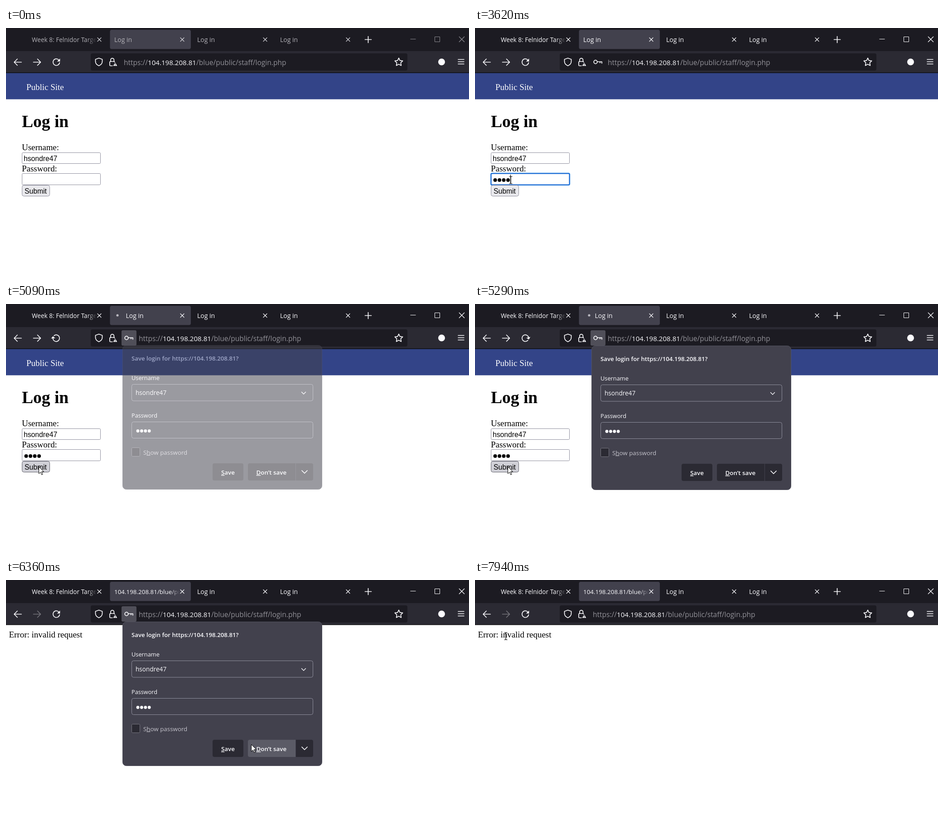
An HTML page that plays this animation: 1022 px wide and 548 px high, repeating every 8 s.

```html
<!DOCTYPE html>
<html lang="en">
<head>
<meta charset="utf-8">
<title>Login form</title>
<style>
html, body { margin: 0; width: 100%; height: 100%; overflow: hidden; background: #fff; }
svg { display: block; width: 1022px; height: 548px; }
text { white-space: pre; }
.ui { font-family: "Open Sans", "Noto Sans", sans-serif; font-size: 14px; fill: #fbfbfe; }
.serif { font-family: "Liberation Serif", "Times New Roman", serif; font-size: 18.95px; fill: #000; }
.form { font-family: "Liberation Sans", Arial, sans-serif; font-size: 15.7px; fill: #000; }
.line { fill: none; stroke: #fbfbfe; stroke-width: 1.7; stroke-linecap: round; stroke-linejoin: round; }
.thin { stroke-width: 1.2; }
.box { fill: #fff; stroke: #8f8f9d; }
.field { fill: #42414d; stroke: #8f8f9d; }
.bold { font-weight: 600; }
.key { text-decoration: underline; }
</style>
</head>
<body>
<svg viewBox="0 0 1022 548">
  <defs>
    <linearGradient id="fadeDark"><stop offset="0" stop-color="#1c1b22" stop-opacity="0"/><stop offset=".45" stop-color="#1c1b22"/></linearGradient>
    <linearGradient id="fadeTab"><stop offset="0" stop-color="#42414d" stop-opacity="0"/><stop offset=".5" stop-color="#42414d"/></linearGradient>
  </defs>
  <rect width="1022" height="548" fill="#fff"/>

  <g id="login">
    <rect y="99" width="1022" height="58.5" fill="#334488"/>
    <text class="serif" x="45" y="137" style="fill:#fff">Public Site</text>
    <text class="serif" x="35" y="218.5" style="font-size:37.5px;font-weight:bold">Log in</text>
    <text class="serif" x="35" y="270">Username:</text>
    <rect class="box" x="35.5" y="275.5" width="173" height="24" rx="2"/>
    <text class="form" x="39" y="294">hsondre47</text>
    <text class="serif" x="35" y="317">Password:</text>
    <rect id="glow" x="33.5" y="319.5" width="177" height="29" rx="4" fill="#a6d3f7"/>
    <rect id="pass" class="box" x="35.5" y="321.5" width="173" height="25" rx="2"/>
    <g id="dots"></g>
    <rect id="caret" y="324" width="1" height="19"/>
    <rect id="submit" x="35.5" y="347.5" width="61" height="24" rx="4"/>
    <text class="form" x="41" y="365.5">Submit</text>
  </g>
  <text id="error" class="serif" x="6.5" y="127">Error: invalid request</text>

  <rect width="1022" height="51" fill="#1c1b22"/>
  <rect y="51" width="1022" height="47" fill="#2b2a33"/>
  <rect y="98" width="1022" height="1.5" fill="#0c0c0d"/>
  <rect x="229.5" y="4" width="178.5" height="42.5" rx="4" fill="#42414d"/>
  <g id="titles" class="ui">
    <text x="57" y="31" style="font-size:13.6px">Week 8: Felnidor Targets</text>
    <rect x="178" y="8" width="50" height="36" fill="url(#fadeDark)"/>
    <text id="tab" y="31"></text>
    <rect x="363" y="8" width="41" height="36" fill="url(#fadeTab)"/>
    <text x="422" y="31">Log in</text>
    <text x="605" y="31">Log in</text>
  </g>
  <circle id="throb" cy="25" r="2.6" fill="#b9b8c0"/>
  <g id="closers" class="line thin"></g>
  <path class="line" d="M792.5 25.5h14M799.5 18.5v14"/>
  <g id="controls" class="line" style="stroke-linecap:butt">
    <path stroke-width="1" style="stroke-width:1" d="M892.5 24.5h12M946.5 19.5h11v11h-11z"/>
    <path style="stroke-width:1.4" d="M1000 19l12 12m0-12l-12 12"/>
  </g>

  <path class="line" d="M34 75.5H18.5M25 68.5l-7 7 7 7"/>
  <path id="forward" class="line" d="M60.5 75.5H76M69.5 68.5l7 7-7 7"/>
  <g id="reload">
    <path class="line" d="M116.5 70.5A7.3 7.3 0 1 0 118.3 76.5"/>
    <path d="M119.3 67.5v6.5h-6.5z" fill="#fbfbfe"/>
  </g>
  <rect x="187" y="56" width="699" height="38" rx="4" fill="#1c1b22"/>
  <path class="line" d="M205 66.5l7.5 2.8v4.7c0 5-3.5 7.7-7.5 9.5-4-1.8-7.5-4.5-7.5-9.5v-4.7z"/>
  <rect class="line" x="229" y="74" width="11" height="9.5" rx="1.5"/>
  <path class="line" d="M231 74v-3.5a3.7 3.7 0 0 1 7.4 0V74"/>
  <path d="M241 75l5.3 9.3h-10.6z" fill="#fbfbfe" stroke="#1c1b22" stroke-width="1.2"/>
  <path d="M241 78v3m0 1v1.2" stroke="#1c1b22" stroke-width="1.2"/>
  <g id="keyIcon">
    <rect id="keyBack" x="255" y="58" width="33" height="34" rx="3" fill="#504f59"/>
    <circle class="line" cx="266" cy="75" r="3.8"/>
    <path class="line" d="M270 74.5h10v3.5M276 74.5v2.5"/>
  </g>
  <g id="url" class="ui" style="font-size:15.55px">
    <text x="260" y="82" fill="#929198">https://</text>
    <text x="313" y="82" style="font-size:15.1px">104.198.208.81</text>
    <text x="420" y="82" fill="#929198">/blue/public/staff/login.php</text>
  </g>
  <path id="star" class="line"/>
  <circle cx="961.5" cy="75" r="7.5" fill="#fbfbfe"/>
  <path class="line" style="stroke-width:1.5" d="M998 69.5h13m-13 5h13m-13 5h13"/>

  <g id="panel" class="ui" style="font-size:13.35px">
    <rect x="257.5" y="92.5" width="440" height="318" rx="8" fill="#42414d" stroke="#52525e"/>
    <text class="bold" x="277" y="126" style="font-size:13.2px">Save login for https://104.198.208.81?</text>
    <text x="277" y="169" style="font-size:12.8px">Username</text>
    <rect class="field" x="277.5" y="178.5" width="400" height="36.5" rx="4"/>
    <text x="286" y="202" style="font-size:13.6px">hsondre47</text>
    <path class="line" style="stroke-width:1.4" d="M652.5 195.5l4.5 4.5 4.5-4.5"/>
    <text x="277" y="252" style="font-size:12.7px">Password</text>
    <rect class="field" x="277.5" y="261.5" width="400" height="36" rx="4"/>
    <g id="panelDots"></g>
    <rect x="277.5" y="318.5" width="18" height="19" rx="2" fill="#2b2a33" stroke="#76757f"/>
    <text x="303" y="333.5" fill="#c4c3cb">S<tspan class="key">h</tspan>ow password</text>
    <rect x="456" y="353" width="68" height="38" rx="4" fill="#2b2a33"/>
    <text class="bold" x="475" y="378"><tspan class="key">S</tspan>ave</text>
    <path id="dont" d="M538 353h101v38h-101a4 4 0 0 1-4-4v-30a4 4 0 0 1 4-4z"/>
    <text class="bold" x="552.5" y="378"><tspan class="key">D</tspan>on’t save</text>
    <path d="M640 353h34a4 4 0 0 1 4 4v30a4 4 0 0 1-4 4h-34z" fill="#2b2a33"/>
    <path class="line" d="M653 369l6 6 6-6"/>
  </g>

  <path id="arrow" d="M.5 .5v15.5l3.7-3.4 2.5 5.7 2.4-1-2.5-5.6h5z" fill="#fff" stroke="#000"/>
  <path id="beam" fill="none" stroke-width="1.2" d="M-3.5-8h2.5l1 1 1-1h2.5M0-7V7M-3.5 8h2.5l1-1 1 1h2.5"/>
</svg>
<script>
const LOOP = 8000;
const $ = id => document.getElementById(id);
const set = (id, attrs) => { for (const k in attrs) $(id).setAttribute(k, attrs[k]); };
const show = (id, on) => { $(id).style.display = on ? '' : 'none'; };
const within = (t, a, b) => t >= a && t < b;
// value of the last step reached
const step = (t, first, ...steps) => steps.reduce((v, [at, next]) => t >= at ? next : v, first);

// pointer moves: first change, last change, steps, end x, end y
const START = [868, 563];
const MOVES = [
  [510, 660, 3, 501, 359],
  [920, 1470, 9, 80, 358],
  [2130, 2130, 1, 81, 341],
  [2200, 2270, 2, 79, 336],
  [4150, 4560, 6, 72, 359],
  [5490, 5760, 5, 365, 376],
  [5830, 6160, 6, 541, 363],
  [6910, 6910, 1, 285, 239],
  [6980, 7050, 2, 93, 145],
  [7250, 7530, 5, 531, 77],
  [7600, 7940, 6, 68, 124]
];

function pointer(t) {
  let [x, y] = START;
  MOVES.forEach(([from, to, n, ex, ey], i) => {
    if (t < from) return;
    const gap = (to - from) / Math.max(1, n - 1) || 1;
    const p = Math.min(n, Math.floor((t - from) / gap + 0.01) + 1) / n;
    const e = i === 1 || i > 8 ? 1 - (1 - p) ** 2 : p;
    x += (ex - x) * e;
    y += (ey - y) * e;
  });
  return [Math.round(x), Math.round(y)];
}

function circles(id, x, y, gap, r, fill) {
  $(id).innerHTML = [0, 1, 2, 3].map(i =>
    `<circle cx="${x + i * gap}" cy="${y}" r="${r}" fill="${fill}"/>`).join('');
}
circles('dots', 44.5, 336, 9.5, 4, '#000');
circles('panelDots', 291, 281.5, 8.4, 3.4, '#fbfbfe');
$('closers').innerHTML = [206, 389, 572, 755].map(x =>
  `<path d="M${x - 4} 21.5l8 8m0-8l-8 8"/>`).join('');
set('star', { d: 'M' + Array.from({ length: 10 }, (_, i) => {
  const a = i * Math.PI / 5, r = i % 2 ? 4.5 : 9.2;
  return [867 + r * Math.sin(a), 75.5 - r * Math.cos(a)].map(v => v.toFixed(1));
}).join('L') + 'z' });

function draw(t) {
  const [x, y] = pointer(t);
  const failed = t >= 5360;
  const loading = within(t, 4960, 5360);
  const active = t >= 2470;
  const focus = within(t, 2470, 4890);
  const keyed = within(t, 3270, 6510);

  show('login', !failed);
  show('error', failed);

  // form
  const inField = !failed && x > 35 && x < 209 && within(y, 321, 348);
  const onSubmit = x > 35 && x < 97 && within(y, 348, 372);
  show('glow', focus);
  set('pass', { style: focus ? 'stroke:#0a5fd0;stroke-width:2' : inField ? 'stroke:#5f5f6b' : '' });
  set('submit', {
    fill: within(t, 4890, 4960) ? '#b1b1b9' : onSubmit ? '#d0d0d7' : '#e9e9ed',
    stroke: onSubmit ? '#62626c' : '#8f8f9d'
  });
  const typed = step(t, 0, [3200, 1], [3340, 2], [3480, 3], [3550, 4]);
  [...$('dots').children].forEach((dot, i) => { dot.style.display = i < typed ? '' : 'none'; });
  show('caret', within(t, 2470, 3000) || within(t, 3200, 4080) || within(t, 4620, 4890));
  set('caret', { x: 40 + Math.round(typed * 9.4) });

  // browser frame
  $('titles').style.fill = active ? '#fbfbfe' : '#b2b1b7';
  $('closers').style.stroke = active ? '#fbfbfe' : '#d5d4da';
  $('controls').style.stroke = active ? '#fbfbfe' : '#8b8a90';
  $('tab').textContent = failed ? '104.198.208.81/blue/pub' : 'Log in';
  set('tab', { x: loading ? 264.5 : 239, style: failed ? 'font-size:13.4px' : '' });
  show('throb', loading);
  set('throb', { cx: 246 + 6 * Math.sin((t - 5090) / 120) });
  set('forward', { opacity: failed ? 0.35 : 1 });
  const turn = step(t, 0, [4960, -40], [5020, -90], [5090, -140], [5150, -200], [5220, -270], [5290, -330], [5360, 0]);
  set('reload', { transform: `rotate(${turn} 111 75.5)`, opacity: within(t, 5360, 5970) ? 0.35 : 1 });
  show('keyIcon', keyed);
  show('keyBack', t >= 5020);
  set('url', { transform: `translate(${keyed ? 33 : 0})` });

  // save prompt
  const alpha = step(t, 0, [5020, 0.1], [5090, 0.53], [5150, 1], [6430, 0.4], [6510, 0]);
  show('panel', alpha > 0);
  set('panel', { opacity: alpha, transform: `translate(0 ${t < 5090 ? -5 : t < 5150 ? -1 : 0})` });
  const onDont = within(x, 534, 640) && within(y, 353, 391);
  set('dont', { fill: onDont ? (t >= 6360 ? '#5b5b66' : '#52525e') : '#2b2a33' });

  // pointer
  const onUrl = within(y, 58, 95) && within(x, 255, 850);
  const onText = failed && within(y, 110, 132) && x < 170;
  const beam = inField || onUrl || onText;
  show('arrow', !beam);
  show('beam', beam);
  set(beam ? 'beam' : 'arrow', { transform: `translate(${x} ${y})` });
  set('beam', { stroke: onUrl ? '#fff' : '#000' });
}

const began = performance.now();
function tick(now) {
  draw(Math.max(0, now - began) % LOOP);
  requestAnimationFrame(tick);
}
draw(0);
requestAnimationFrame(tick);
</script>
</body>
</html>
```
